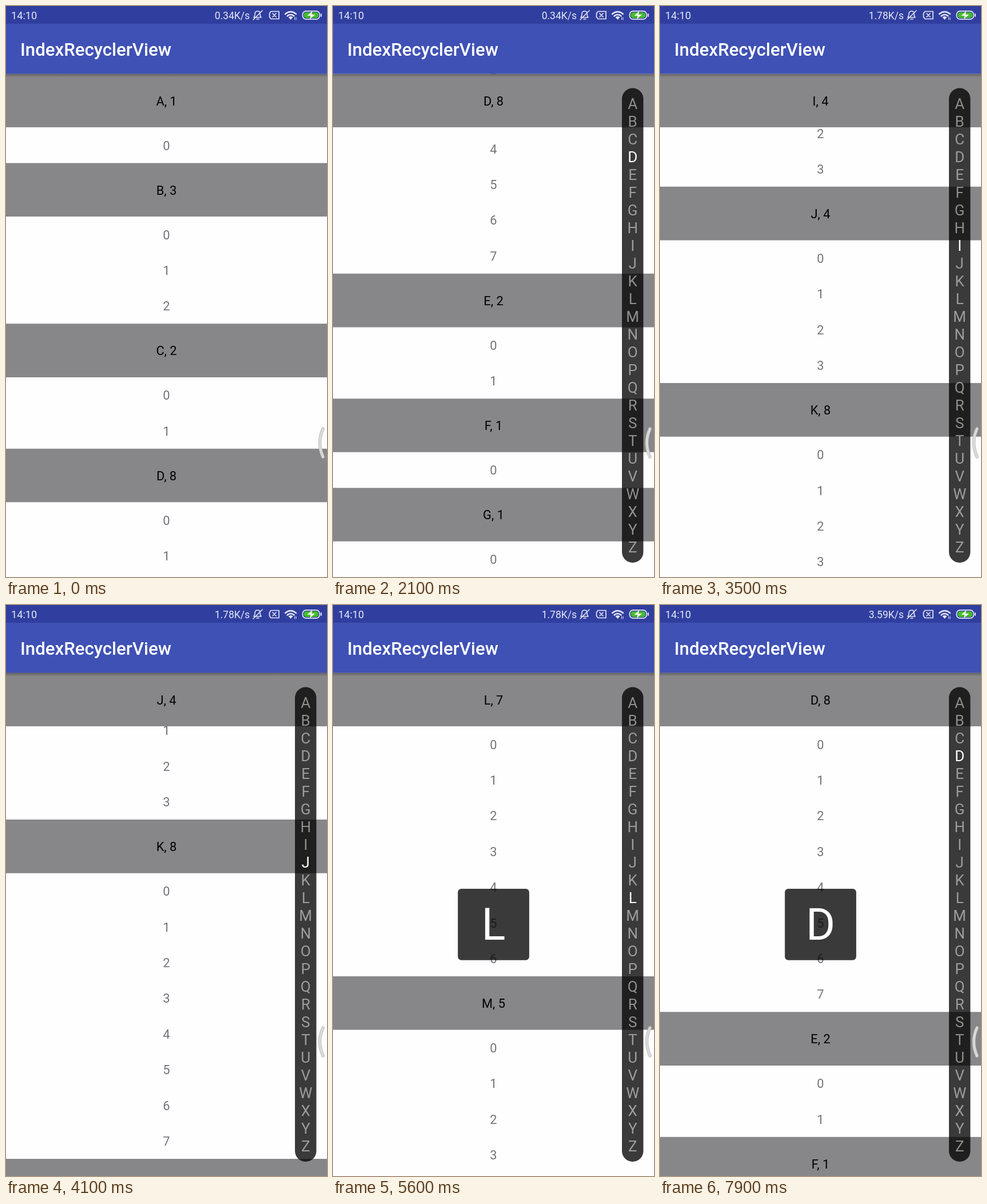
Write an HTML page with a canvas that moves like this. It is 561x998 px and loops after 8000 ms.

```html
<!DOCTYPE html>
<html lang="en">
<head>
<meta charset="utf-8">
<title>IndexRecyclerView</title>
<style>
html, body { margin: 0; width: 100%; height: 100%; overflow: hidden; background: #fefdff; }
canvas { display: block; width: 561px; height: 998px; }
</style>
</head>
<body>
<canvas id="stage" width="561" height="998"></canvas>
<script>
const ctx = document.getElementById('stage').getContext('2d');
const W = 561, H = 998, LOOP = 8000;
const LIST_TOP = 118.5, HEADER = 93.6, ITEM = 62.4;
const LETTERS = 'ABCDEFGHIJKLMNOPQRSTUVWXYZ';
const COUNTS = [1, 3, 2, 8, 2, 1, 1, 8, 4, 4, 8, 7, 5];

let end = 0;
const sections = COUNTS.map((count, i) => {
  const section = { letter: LETTERS[i], count, top: end };
  end += HEADER + count * ITEM;
  return section;
});

// Finger scrolling: time, offset, velocity in px/ms
const FLINGS = [[500, 0, 0], [2100, 898, 0.7], [3000, 2037.7, 1], [4100, 2801, 0]];
// Dragging along the index bar: time, letter
const JUMPS = [[4400, 'K'], [5200, 'L'], [5900, 'K'], [6300, 'J'], [6600, 'I'],
  [6800, 'H'], [7000, 'G'], [7200, 'F'], [7400, 'E'], [7600, 'D']];
const SPEEDS = [[0, '0.34K/s'], [3300, '1.78K/s'], [7300, '3.59K/s']];

const latest = (list, t) => list.filter(entry => entry[0] <= t).pop();

function flingOffset(t) {
  const i = FLINGS.findLastIndex(p => p[0] <= t);
  if (i < 0) return 0;
  const [t0, y0, v0] = FLINGS[i];
  if (i === FLINGS.length - 1) return y0;
  const [t1, y1, v1] = FLINGS[i + 1];
  const d = t1 - t0, s = (t - t0) / d, r = 1 - s;
  return y0 * r * r * (1 + 2 * s) + y1 * s * s * (3 - 2 * s) + d * s * r * (v0 * r - v1 * s);
}

function text(str, x, y, size, color, align = 'center', weight = 400) {
  ctx.font = `${weight} ${size}px Roboto, sans-serif`;
  ctx.textAlign = align;
  ctx.fillStyle = color;
  ctx.fillText(str, x, y);
}

function rect(x, y, w, h, color, radius = 0) {
  ctx.fillStyle = color;
  ctx.beginPath();
  ctx.roundRect(x, y, w, h, radius);
  ctx.fill();
}

function stroke(path, color, width) {
  ctx.strokeStyle = color;
  ctx.lineWidth = width;
  ctx.stroke(new Path2D(path));
}

function drawHeader(section, y) {
  rect(0, y, W, HEADER, '#878688');
  text(`${section.letter}, ${section.count}`, 280.5, y + 55.1, 21.8, '#000');
}

function drawList(offset, current) {
  rect(0, 0, W, H, '#fefdff');
  for (const section of sections) {
    const y = LIST_TOP + section.top - offset;
    drawHeader(section, y);
    for (let i = 0; i < section.count; i++) {
      text(i, 280.5, y + HEADER + i * ITEM + 39.5, 21.8, '#747474');
    }
  }
  const next = sections[current + 1];
  const push = next ? Math.min(0, next.top - offset - HEADER) : 0;
  drawHeader(sections[current], LIST_TOP + push);
}

function drawIndexBar(current, opacity) {
  ctx.globalAlpha = opacity;
  rect(505, 143.5, 37.4, 829.5, 'rgba(0,0,0,.77)', 18.7);
  [...LETTERS].forEach((letter, i) =>
    text(letter, 523.7, 180.4 + i * 31, 26, i === current ? '#fff' : 'rgba(255,255,255,.5)'));
  ctx.globalAlpha = 1;
}

function drawPopup(letter) {
  rect(218.2, 496, 124.7, 124.7, 'rgba(0,0,0,.77)', 6);
  text(letter, 280.5, 585, 78, '#fff');
}

function drawEdgeHandle() {
  const arc = 'M554 739Q543 763 554 788';
  stroke(arc, '#bebebe', 5.6);
  stroke(arc, '#d9d9d9', 4);
}

function drawStatusIcons() {
  const ink = '#e6e8f5';
  // muted bell
  stroke('M433 20H446Q444 18 444 14Q444 9 440 9Q435 9 435 14Q435 18 433 20M438 23H442M448 8L432 24', ink, 1.6);
  // missing SIM
  stroke('M463 9.5H477V22.5H463L460.5 19V13ZM466 13L472 19M472 13L466 19', ink, 1.7);
  // wifi
  stroke('M488 14Q497.500 6 507 14M491.500 17.500Q497.500 12.500 503.500 17.500', ink, 2.4);
  ctx.fillStyle = ink;
  ctx.fill(new Path2D('M493.500 19.500Q497.500 16.500 501.500 19.500L497.500 24Z'));
  stroke('M504.500 20V24M507 20V24', ink, 1);
  // charging battery
  rect(517.5, 8, 31.5, 16, ink, 7);
  rect(519.2, 9.7, 28.1, 12.6, '#303f9f', 5.5);
  rect(520.5, 11, 25.5, 10, '#45bd2b', 4.5);
  rect(549.8, 13, 2, 6, ink, 1);
  ctx.fillStyle = '#fff';
  ctx.fill(new Path2D('M535 9L526.500 17H532.500L531 23L540 15H534Z'));
}

function drawAppBar(t) {
  const shadow = ctx.createLinearGradient(0, LIST_TOP, 0, LIST_TOP + 6);
  shadow.addColorStop(0, 'rgba(0,0,0,.28)');
  shadow.addColorStop(1, 'rgba(0,0,0,0)');
  rect(0, LIST_TOP, W, 6, shadow);
  rect(0, 0, W, LIST_TOP, '#3f51b5');
  rect(0, 0, W, 31, '#303f9f');
  text('IndexRecyclerView', 25, 87, 31.2, '#fff', 'left', 500);
  text('14:10', 9, 23, 18.2, '#e6e8f5', 'left');
  text(latest(SPEEDS, t)[1], 426, 22.5, 17.5, '#e6e8f5', 'right');
  drawStatusIcons();
}

function draw(t) {
  const jump = latest(JUMPS, t);
  const offset = jump ? sections[LETTERS.indexOf(jump[1])].top : flingOffset(t);
  const current = sections.findLastIndex(s => s.top <= offset + 0.01);
  drawList(offset, current);
  drawIndexBar(current, Math.min(1, Math.max(0, (t - 450) / 200)));
  if (jump) drawPopup(jump[1]);
  drawEdgeHandle();
  drawAppBar(t);
}

ctx.lineCap = 'round';
ctx.lineJoin = 'round';
const start = performance.now();
function tick() {
  draw((performance.now() - start) % LOOP);
  requestAnimationFrame(tick);
}
tick();
</script>
</body>
</html>
```
